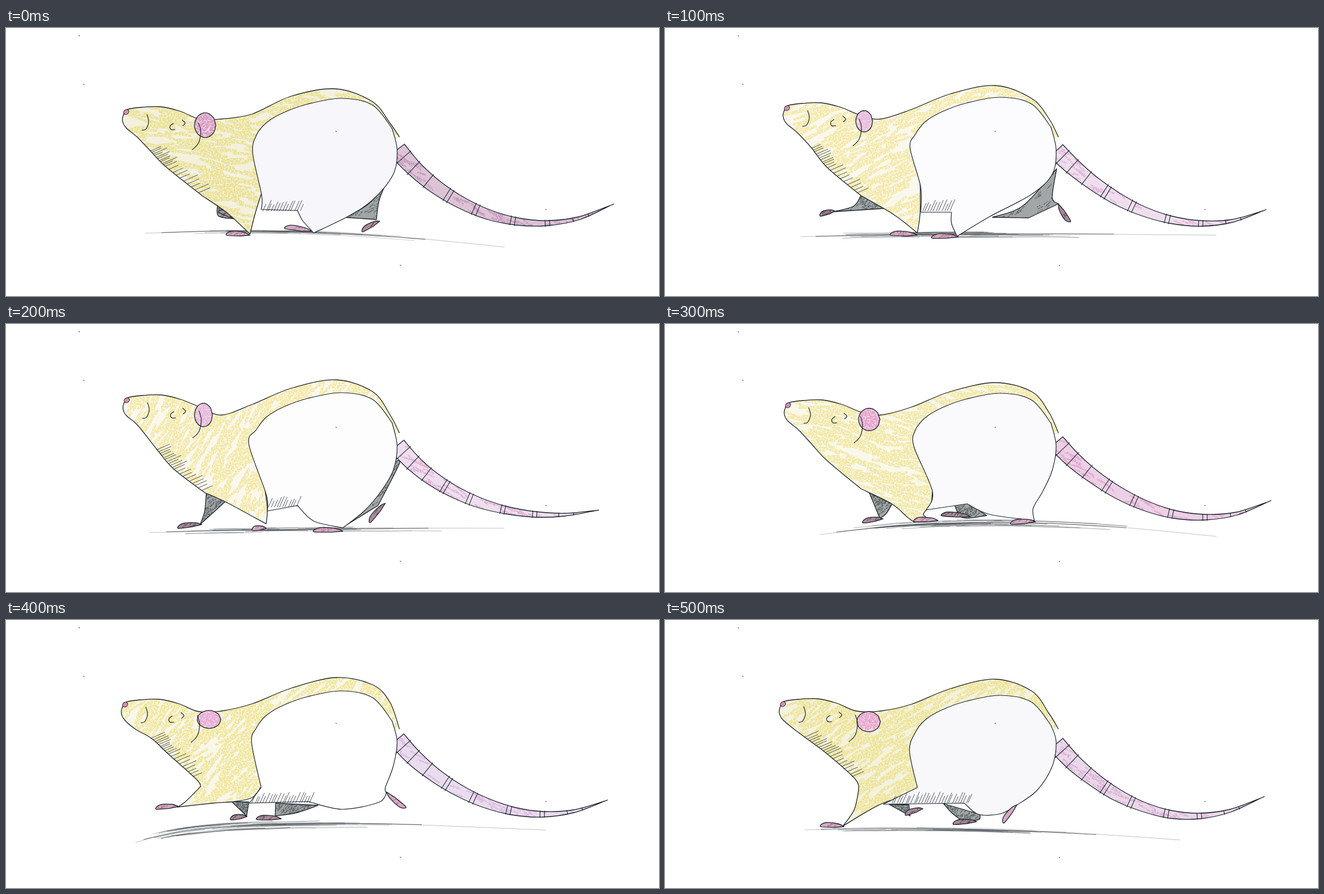
An HTML page for the animation above (0.6 s loop, 1167x480 px).

```html
<!DOCTYPE html>
<html lang="en">
<head>
<meta charset="utf-8">
<title>Walking rat</title>
<style>
  html, body { margin: 0; width: 100%; height: 100%; overflow: hidden; background: #fff; }
  svg { position: absolute; inset: 0; width: 100%; height: 100%; }
  .pose { opacity: 0; will-change: opacity; }
  .pose path { stroke-linecap: round; stroke-linejoin: round; }
</style>
</head>
<body>
<svg viewBox="0 0 1167 480">
  <filter id="grain" color-interpolation-filters="sRGB">
    <feTurbulence type="fractalNoise" baseFrequency=".4" numOctaves="2" seed="9"/>
    <feColorMatrix values="0 0 0 0 0  0 0 0 0 0  0 0 0 0 0  0 0 0 4 -1.3" result="noise"/>
    <feComposite in="SourceGraphic" in2="noise" operator="in"/>
  </filter>
</svg>
<script>
const STEP = 100;
const INK = "#18222a";

// Each pose keeps only the key points that move; "/" marks a corner in a curve.
// back: heights over BACK_X. dome: shift of the white patch. foot: ankle x, y, length, angle.
// tail: root y, two control heights, tip. ground: curve and spread.
const poses = [
  {
    nose: [211, 152], ear: [356, 174, 19, 22], back: [170, 132, 109, 122, 154], dome: 0,
    chest: "258,220 285,248 350,300/395,331 436,369/446,330 457,295",
    flank: "441,225 457,300 456,325/521,327/530,345 550,367/610,338 655,308",
    far: ["603,339 650,313 690,255/668,305 662,343", "378,318 380,337 411,342/385,322"],
    farFeet: [[668, 346, 36, -.56], [410, 341, 32, .35]],
    feet: [[436, 371, 42, 0], [546, 364, 48, .1]],
    tail: [218, 310, 400, 1082, 317], ground: ["250,368 550,366 890,392", 3],
    fur: [459, 530], coat: ["#f3f1dd", "#e9dd80", .1], pink: ["#dcc3d6", "#bf8db4"], earTone: "#d08ab4", white: "#f6f6fb"
  },
  {
    nose: [214, 145], ear: [356, 167, 15, 19], back: [162, 126, 103, 118, 146], dome: -2,
    chest: "262,215 290,250 350,300/410,335 451,367/456,330 456,270",
    flank: "438,215 457,285 457,330/512,330/512,350 522,373/580,338 655,298",
    far: ["585,339 640,318 700,252/692,303 703,315/650,340", "350,300 337,319 302,329/396,323"],
    farFeet: [[703, 315, 38, -2.19], [304, 328, 28, -.33]],
    feet: [[451, 371, 48, 0], [524, 374, 47, -.05]],
    tail: [220, 295, 397, 1070, 327], ground: ["243,374 560,369 985,371", 5],
    fur: [461, 514], coat: ["#faf8ee", "#f3e490", -.5], pink: ["#efdfee", "#dca9d2"], earTone: "#e5b5d8", white: "#fcfbfe"
  },
  {
    nose: [212, 138], ear: [353, 163, 16, 21], back: [162, 121, 100, 115, 144], dome: -3,
    chest: "270,225 300,260 355,302/395,320 465,358/467,330 462,290",
    flank: "434,215 465,305 467,335/521,325/550,353 602,365/640,335 670,300",
    far: ["605,362 665,305 694,248/703,250 665,325", "358,302 355,335 347,359/392,318"],
    farFeet: [[678, 321, 44, -.91], [350, 359, 43, -.16]],
    feet: [[465, 366, 25, -.15], [602, 371, 52, -.02]],
    tail: [218, 306, 364, 1055, 334], ground: ["258,373 560,367 890,366", 4],
    fur: [470, 523], coat: ["#faf8ee", "#f2e48f", -1], pink: ["#efdfee", "#d8a4ce"], earTone: "#e2b2d6", white: "#fdfdfe"
  },
  {
    nose: [216, 147], ear: [365, 171, 19, 20], back: [158, 121, 105, 121, 149], dome: -2,
    chest: "262,215 290,245 350,295/405,322 432,345 445,355/466,348 462,340 475,322 478,300",
    flank: "445,220 478,300 467,333/540,322/580,341 660,352/658,330 675,300",
    far: ["517,323 532,347 575,343/540,320", "365,302 384,348/395,340 406,322"],
    farFeet: [[546, 345, 52, .03], [390, 349, 37, -.2]],
    feet: [[488, 352, 43, -.04], [662, 354, 44, -.1]],
    tail: [212, 294, 397, 1079, 318], ground: ["277,377 600,355 985,380", 6],
    fur: null, coat: ["#f9f8ea", "#f1e391", .2], pink: ["#ecd0e6", "#de9dcb"], earTone: "#e596c4", white: "#fafafd"
  },
  {
    nose: [209, 153], ear: [363, 178, 21, 16], back: [147, 116, 103, 122, 150], dome: 1,
    chest: "260,212 290,240 340,285 348,298/320,326 306,335/370,328 410,325 440,318 455,300",
    flank: "439,220 456,300/435,328/540,325/600,339 665,327 680,310/678,300",
    far: ["482,328 481,351/520,345 558,332", "403,325 430,351/434,326"],
    farFeet: [[431, 352, 30, -.2], [492, 356, 44, -.03]],
    feet: [[308, 334, 40, -.12], [680, 308, 44, 3.8]],
    tail: [214, 300, 392, 1071, 324], ground: ["232,398 480,366 965,376", 7],
    fur: [440, 548], coat: ["#f8f7ea", "#f0e285", -.8], pink: ["#e9dcee", "#d9aedb"], earTone: "#e69fce", white: "#ffffff"
  },
  {
    nose: [207, 152], ear: [364, 182, 21, 18], back: [167, 127, 106, 123, 151], dome: 9,
    chest: "250,210 290,240 340,285 346,305/338,340 318,369/385,330 445,310 451,300",
    flank: "437,235 451,300/390,330/535,328/560,348 600,347 628,332/665,305",
    far: ["498,329 512,345 530,359/560,358 563,348", "400,330 438,351/436,331"],
    farFeet: [[557, 361, 42, -.12], [461, 338, 33, -.37]],
    feet: [[320, 370, 42, 0], [629, 331, 40, -.95]],
    tail: [222, 308, 403, 1067, 318], ground: ["250,376 560,375 920,394", 4],
    fur: [405, 548], coat: ["#f4f2df", "#ede07f", -.6], pink: ["#ead8ea", "#d6a7d0"], earTone: "#e398c2", white: "#f8f8fb"
  }
];

// Parts that keep their shape; head points are relative to the nose.
const BACK_X = [686, 655, 590, 510, 440];
const HEAD = "135,11 100,-3 65,-11 32,-10 5,-6 0,0/-3,13 3,26 23,43";
const FACE = ["41,3 44,16 39,29 32,31", "88,19 82,24 84,30 91,30", "104,13 109,18 105,23", "133,18 137,33 133,54 122,66"];
const DOME = "690,180 655,138 600,126 540,136 495,152 465,170 447,193";
const HIP = "692,262 699,218";
const DUST = "131,14 139,101 705,425 590,185 965,325";
const RINGS = [.05, .12, .21, .31, .44, .6, .74, .85, .91];

let seed = 7;
const random = () => (seed = seed * 16807 % 2147483647) / 2147483647;
const jitter = size => (random() - .5) * 2 * size;
const points = text => text.split(/[\s/]+/).map(pair => pair.split(",").map(Number));
const shift = (text, dx, dy) => text.replace(/([-\d.]+),([-\d.]+)/g, (_, x, y) => `${+x + dx},${+y + dy}`);
const repeat = (count, make) => Array.from({ length: count }, (_, i) => make(i));

function add(parent, name, attributes) {
  const node = document.createElementNS("http://www.w3.org/2000/svg", name);
  for (const key in attributes) node.setAttribute(key, attributes[key]);
  return parent.appendChild(node);
}

function spline(text) {
  let path = "", last;
  for (const part of text.split("/")) {
    const p = points(part);
    if (last) p.unshift(last); else path = "M" + p[0];
    for (let i = 0; i < p.length - 1; i++) {
      const [a, b, c, d] = [p[i - 1] || p[i], p[i], p[i + 1], p[i + 2] || p[i + 1]];
      const out = b.map((v, k) => (v + (c[k] - a[k]) / 6).toFixed(1));
      const into = c.map((v, k) => (v - (d[k] - b[k]) / 6).toFixed(1));
      path += `C${out} ${into} ${c}`;
    }
    last = p[p.length - 1];
  }
  return path;
}

function bezier(p, t) {
  while (p.length > 1) p = p.slice(1).map((q, i) => q.map((v, k) => p[i][k] + (v - p[i][k]) * t));
  return p[0];
}

function line(parent, d, width = 1.3, opacity = 1, color = INK) {
  return add(parent, "path", { d, fill: "none", stroke: color, "stroke-width": width, opacity });
}

// Fills a shape with a flat tone and grainy strokes running at one angle.
let clips = 0;
function crayon(parent, text, [base, color, angle = -.7], count, size, closed = true) {
  const d = spline(text), id = "clip" + clips++;
  add(add(parent, "clipPath", { id }), "path", { d });
  add(parent, "path", { d: d + "Z", fill: base });
  const p = points(text), xs = p.map(q => q[0]), ys = p.map(q => q[1]);
  const left = Math.min(...xs), top = Math.min(...ys);
  const width = Math.max(...xs) - left, height = Math.max(...ys) - top;
  const strokes = repeat(count, () => {
    const turn = angle + jitter(.3), length = size * (3 + random() * 7);
    return `M${left + random() * width} ${top + random() * height}l${Math.cos(turn) * length} ${Math.sin(turn) * length}`;
  }).join("");
  const fill = line(parent, strokes, size, .85, color);
  fill.setAttribute("clip-path", `url(#${id})`);
  fill.setAttribute("filter", "url(#grain)");
  line(parent, closed ? d + "Z" : d);
}

function drawGround(parent, [text, spread]) {
  const [start, middle, end] = points(text);
  const curve = [start, middle.map((v, k) => 2 * v - (start[k] + end[k]) / 2), end];
  const stroke = (from, to, width, opacity, drop) => {
    const path = repeat(5, i => bezier(curve, from + (to - from) * i / 4)).map(([x, y]) => `${x},${y + drop + jitter(.6)}`);
    line(parent, spline(path.join(" ")), width, opacity, "#454c52");
  };
  stroke(0, 1, .7, .5, 0);
  stroke(.05, .8, 1.2, .7, 0);
  repeat(spread * 5, () => {
    const from = .1 + random() * .4;
    stroke(from, from + .1 + random() * .25, .6 + random(), .2 + random() * .4, jitter(spread) + 1);
  });
}

function hatch(parent, line0, count, dx, dy) {
  const d = repeat(count, i => {
    const at = i / count * (line0.length - 1), k = Math.floor(at);
    const [x, y] = line0[k].map((v, axis) => v + (line0[k + 1][axis] - v) * (at - k));
    const reach = .6 + random() * .5;
    return `M${x + jitter(1.5)} ${y}l${dx * reach} ${dy * reach}`;
  }).join("");
  line(parent, d, .9, .85);
}

function drawTail(parent, { tail: [root, bend, sag, tipX, tipY], pink }) {
  const curve = [[699, root], [770, bend], [tipX - 152, sag], [tipX, tipY]];
  const edge = (t, side) => {
    const [x, y] = bezier(curve, t), [u, v] = bezier(curve, t + .001);
    const half = 16 * (1 - t) ** .85 * side / Math.hypot(u - x, v - y);
    return [x + (v - y) * half, y - (u - x) * half];
  };
  const side = s => repeat(9, i => edge(i / 8, s).map(Math.round).join());
  crayon(parent, side(1).join(" ") + "/" + side(-1).reverse().join(" "), [...pink, .5], 300, 3);
  RINGS.forEach((t, i) => {
    for (const at of i > 2 && i < 7 ? [t, t + .018] : [t]) line(parent, `M${edge(at, 1.15)}L${edge(at, -1.15)}`, 1.1);
  });
}

function drawFoot(parent, [x, y, length, angle], tones) {
  const shape = [[0, 0], [-.25, -5], [-.8, -7], [-1, 0], [-.4, 1.5]].map(([along, up]) => {
    const u = along * length;
    return [x + u * Math.cos(angle) - up * Math.sin(angle), y + u * Math.sin(angle) + up * Math.cos(angle)].join();
  });
  crayon(parent, shape.join(" "), tones, 12, 2);
}

function drawHead(parent, { nose: [x, y], ear: [cx, cy, rx, ry], earTone }) {
  const rim = repeat(10, i => `${cx + rx * Math.cos(i * Math.PI / 5)},${cy + ry * Math.sin(i * Math.PI / 5)}`);
  crayon(parent, rim.join(" "), ["#f0d6e8", earTone], 90, 4);
  add(parent, "ellipse", { cx: x + 4, cy: y + 1, rx: 5, ry: 4, fill: "#d98db0", stroke: INK, transform: `rotate(-35 ${x} ${y})` });
  FACE.forEach(mark => line(parent, spline(shift(mark, x, y)), 1.2));
}

function drawPose(pose) {
  const g = add(document.body, "svg", { class: "pose", viewBox: "0 0 1167 480" });
  const back = BACK_X.map((x, i) => `${x},${pose.back[i]}`).join(" ");
  const body = `703,195 ${back} 385,163 ${shift(HEAD, ...pose.nose)} ${pose.chest}`;
  const dome = shift(DOME, 0, pose.dome);
  const patch = `${dome} ${pose.flank} ${HIP} ${dome.split(" ")[0]}`;

  drawGround(g, pose.ground);
  pose.far.forEach(leg => crayon(g, leg, ["#a2a6a7", "#4f5659"], 90, 1.6));
  pose.farFeet.forEach(foot => drawFoot(g, foot, ["#a98a9a", "#5d4a55"]));
  drawTail(g, pose);
  crayon(g, body, pose.coat, 900, 5, false);
  add(g, "path", { d: spline(patch), fill: pose.white, stroke: INK, "stroke-width": 1.2 });
  pose.feet.forEach(foot => drawFoot(g, foot, ["#d7a9c2", "#a9718f"]));
  if (pose.fur) {
    const [from, to] = pose.fur;
    hatch(g, points(pose.chest).slice(0, 3), 20, 23, -10);
    hatch(g, [[from, 328], [to, 327]], Math.round((to - from) / 5), 8, -18);
  }
  drawHead(g, pose);
  points(DUST).forEach(([cx, cy]) => add(g, "circle", { cx, cy, r: 1, fill: "#666" }));
  return g;
}

const loop = poses.length * STEP;
poses.map(drawPose).forEach((svg, i) => svg.animate([
  { opacity: 1, offset: 0, easing: "step-end" },
  { opacity: 0, offset: 1 / poses.length, easing: "step-end" },
  { opacity: 0, offset: 1 }
], { duration: loop, delay: i * STEP - loop, iterations: Infinity }));
</script>
</body>
</html>
```
